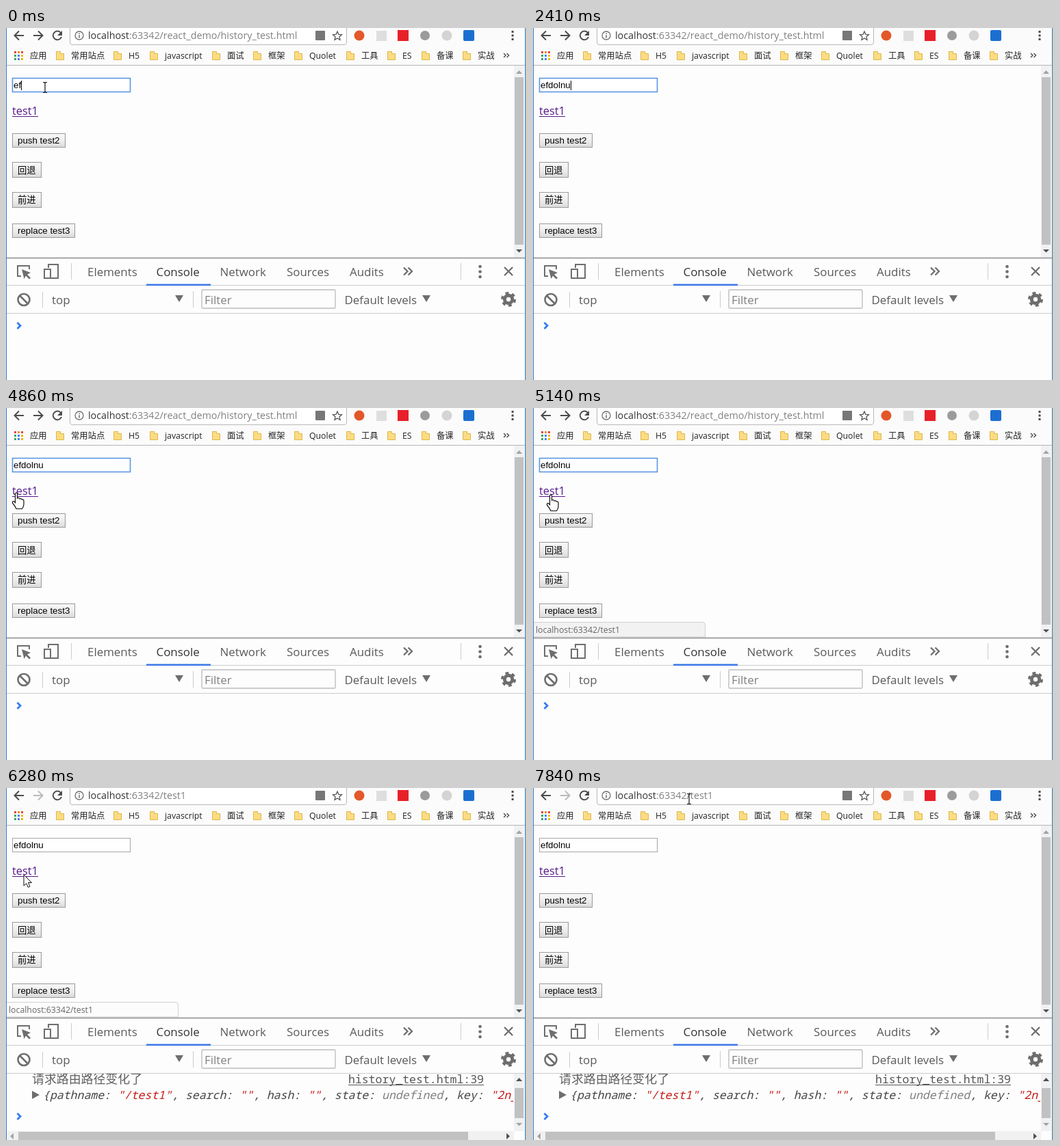
Animation of 761x515 px, one loop 7990 ms. Source, as an HTML page:

```html
<!DOCTYPE html>
<html lang="zh">
<head>
<meta charset="utf-8">
<title>history test</title>
<style>
html, body { margin: 0; width: 100%; height: 100%; overflow: hidden; background: #fdfdfd; }
svg { display: block; width: 100vw; height: 100vh; font-family: "Open Sans", "Noto Sans CJK SC", "Noto Sans CJK", sans-serif; }
.bar { font-size: 12.3px; fill: #222; }
.url { font-size: 14.3px; fill: #808080; }
.form { font: 13.33px "Liberation Sans", "Noto Sans CJK SC", "Noto Sans CJK", sans-serif; }
.tools { font-size: 16.9px; fill: #5a5a5a; }
.mono { font-family: "Noto Sans Mono", "Noto Sans CJK SC", monospace; font-size: 16.5px; }
.line { fill: none; stroke: #6e6e6e; stroke-width: 2; }
.nav { fill: none; stroke: #4c4c4c; stroke-width: 2; }
.rule { fill: none; stroke: #ccc; }
.track { fill: #f1f1f1; }
.thumb { fill: #c1c1c1; }
.dark { fill: #505050; }
.pale { fill: #a3a3a3; }
.grey { fill: #6e6e6e; }
.str { fill: #c41a16; }
</style>
</head>
<body>
<svg viewBox="0 0 761 515">
  <defs>
    <linearGradient id="face" x2="0" y2="1">
      <stop stop-color="#f8f8f8"/><stop offset=".5" stop-color="#eee"/><stop offset="1" stop-color="#dadada"/>
    </linearGradient>
    <clipPath id="log"><rect x="1" y="418" width="740" height="84"/></clipPath>
  </defs>
  <rect width="761" height="515" fill="#fdfdfd"/>
  <rect width="758" height="54" fill="#fbfbfb"/>

  <!-- address bar -->
  <path class="nav" d="M26 11H13M19 4.500L12.500 11L19 17.500"/>
  <path id="forward" class="nav" d="M40 11H53M47 4.500L53.500 11L47 17.500"/>
  <path class="nav" d="M80 7A6.300 6.300 0 1 0 81 13"/>
  <path fill="#4c4c4c" d="M82 4V11H75Z"/>
  <path d="M93.500 -2V21Q93.500 24.500 97 24.500H494Q497.500 24.500 497.500 21V-2" fill="#fff" stroke="#b8b8b8"/>
  <circle cx="107" cy="11" r="6" class="line" style="stroke-width:1.300"/>
  <path class="grey" d="M106.200 7.500h1.600v1.600h-1.600zM106.200 10.300h1.600v4.300h-1.600z"/>
  <text class="url" x="120" y="16"><tspan fill="#333">localhost</tspan>:63342<tspan id="path"></tspan></text>
  <rect x="452" y="4" width="14" height="14" rx="1" fill="#777"/>
  <path d="M484 5l1.900 4.300 4.600.4-3.500 3.100 1 4.600-4-2.400-4 2.400 1-4.600-3.500-3.100 4.600-.4z" fill="none" stroke="#555" stroke-width="1.300"/>
  <circle cx="516" cy="11" r="7.500" fill="#e2582a"/>
  <rect x="541" y="4" width="15" height="15" fill="#dedede"/>
  <rect x="572" y="3" width="16" height="16" fill="#e8202a"/>
  <circle cx="612" cy="11" r="7" fill="#9b9b9b"/>
  <circle cx="644" cy="11" r="7.500" fill="#d4d4d4"/>
  <rect x="668" y="3" width="16" height="16" rx="2" fill="#1c6fd0"/>
  <path fill="#4c4c4c" d="M738.500 4h3v3h-3zM738.500 9.500h3v3h-3zM738.500 15h3v3h-3z"/>

  <g id="bookmarks" class="bar">
    <text x="35" y="45">应用</text>
    <path d="M727 37l3 3-3 3M731.500 37l3 3-3 3" fill="none" stroke="#444" stroke-width="1.300"/>
  </g>
  <path stroke="#b5b5b5" d="M1 54.500H758"/>

  <!-- page -->
  <rect id="input" x="9.500" y="73.500" width="172" height="20" fill="#fff"/>
  <text id="typed" class="form" x="11" y="88"></text>
  <rect id="caret" y="77" width="1" height="14"/>
  <g id="link"><text x="9" y="127" font-size="16.400">test1</text><rect x="9" y="129" width="38" height="1"/></g>
  <g id="buttons" class="form"></g>
  <rect class="track" x="742" y="55" width="15" height="280"/>
  <rect class="thumb" x="743" y="72" width="13" height="245"/>
  <path class="pale" d="M745 67l4.500-5 4.500 5z"/>
  <path class="dark" d="M745 324l4.500 4.500 4.500-4.500z"/>
  <g id="status">
    <path id="bubble" d="M1 313.500H248Q251.500 313.500 251.500 317V335H1" stroke="#d0d0d0"/>
    <text x="4" y="329" font-size="12.300" fill="#666">localhost:63342/test1</text>
  </g>

  <!-- developer tools -->
  <rect x="1" y="335.500" width="757" height="2" fill="#a3a3a3"/>
  <path class="rule" d="M1 376.500H758M1 417.500H758M95.500 344V368M664.500 344V368M53.500 386V409M273.500 385V409"/>
  <path class="line" d="M22 363H17V348H34V353"/>
  <path class="grey" d="M23 353l13 5-5 2.500 5 5-2 2-5-5-2.500 4.500z"/>
  <path class="line" d="M62 351V346H76V366H66M56 353H65V366H56Z"/>
  <g class="tools">
    <text x="119" y="363">Elements</text>
    <text x="219.500" y="363" fill="#333">Console</text>
    <text x="312.500" y="363">Network</text>
    <text x="410" y="363">Sources</text>
    <text x="502" y="363">Audits</text>
    <text x="67" y="404">top</text>
    <rect class="rule" x="286" y="383" width="195" height="27" rx="1.500" fill="#fff" style="stroke-width:1.800"/>
    <text x="290" y="404" fill="#808080">Filter</text>
    <text x="494.500" y="404">Default levels</text>
  </g>
  <rect x="205" y="374.500" width="94" height="2.500" fill="#3b78e7"/>
  <path class="line" style="stroke-width:2.300" d="M581 350.500l5.500 5.500-5.500 5.500M587.500 350.500l5.500 5.500-5.500 5.500M728 350l12 12M740 350l-12 12"/>
  <g class="grey"><circle cx="692.500" cy="349" r="2.300"/><circle cx="692.500" cy="356.500" r="2.300"/><circle cx="692.500" cy="364" r="2.300"/></g>
  <path class="grey" d="M247 391h12l-6 10zM608 391h12l-6 10z"/>
  <path class="line" style="stroke-width:2.600" d="M34.500 397.500a8.500 8.500 0 1 0-17 0a8.500 8.500 0 1 0 17 0M20 391.500l12 12"/>
  <circle class="line" cx="734" cy="397" r="5.700" style="stroke-width:5"/>
  <circle class="line" cx="734" cy="397" r="9" style="stroke-width:4;stroke-dasharray:4.700 4.725"/>

  <g id="console">
    <g clip-path="url(#log)">
      <text x="38" y="432" font-size="17.900" fill="#606060">请求路由路径变化了</text>
      <text class="mono" x="500" y="432" fill="#555">history_test.html:39</text>
      <path stroke="#555" d="M500 434.500H698"/>
      <path class="grey" d="M38 443l11 6-11 6z"/>
      <text class="mono" x="54" y="455" font-style="italic" fill="#444">{pathname: <tspan class="str">"/test1"</tspan>, search: <tspan class="str">""</tspan>, hash: <tspan class="str">""</tspan>, state: <tspan fill="#808080">undefined</tspan>, key: <tspan class="str">"2njq"</tspan></text>
    </g>
    <path class="track" d="M742 418h15v84h-15zM1 502h741v13H1z"/>
    <path class="thumb" d="M743 439h13v44h-13zM18 503h657v12H18z"/>
    <path class="dark" d="M745 429l4.500-5 4.500 5zM731 505l5 4.500-5 4.500z"/>
    <path class="pale" d="M745 490l4.500 4.500 4.500-4.500zM11 505l-5 4.500 5 4.500z"/>
  </g>
  <path id="prompt" d="M16.500 431l4.500 4.500-4.500 4.500" fill="none" stroke="#367cf1" stroke-width="2.800"/>
  <path d="M.5 0V515M758.500 0V515" stroke="#2b7cd3"/>
  <rect x="759" width="2" height="515" fill="#d3cbb8"/>

  <!-- pointers, origin at the hot spot -->
  <path id="ibeam" d="M-3 -7.500H-1L0 -6.500L1 -7.500H3M0 -6.500V6.500M-3 7.500H-1L0 6.500L1 7.500H3" fill="none" stroke="#111" stroke-width="1.200"/>
  <path id="arrow" d="M0 0V16L3.700 12.500L6.300 18.300L9 17L6.500 11.500H11.500Z" fill="#fff" stroke="#111"/>
  <path id="hand" d="M-1.500 1Q0 -1 1.500 1V8Q4 6.500 5 9Q7.500 8 8.300 10Q11 9.500 11 12V17Q11 20 8.500 23.500H0Q-2 19 -5.500 15Q-6 12 -3.500 12.500L-1.500 14.500Z" fill="#fff" stroke="#111" stroke-width="1.200"/>
</svg>
<script>
const LOOP = 7990, FOCUS_LOST = 6000, NAVIGATED = 6280;
const $ = id => document.getElementById(id);
const draw = (id, markup) => $(id).insertAdjacentHTML('beforeend', markup);

const gridColors = ['#e8453c', '#f28b25', '#e8453c', '#3aa757', '#4285f4', '#f4b400', '#3aa757', '#4285f4', '#f4b400'];
gridColors.forEach((color, i) =>
  draw('bookmarks', `<rect x="${12 + i % 3 * 5}" y="${34 + Math.floor(i / 3) * 5}" width="3" height="3" fill="${color}"/>`));

[[73, '常用站点'], [157, 'H5'], [210, 'javascript'], [301, '面试'], [361, '框架'], [421, 'Quolet'],
 [497, '工具'], [557, 'ES'], [607, '备课'], [667, '实战']].forEach(([x, label]) =>
  draw('bookmarks', `<path d="M${x + .5} 34.500h6v3h5v9h-11z" fill="#fbdc82" stroke="#dfb64a"/>
    <text x="${x + 22}" y="45">${label}</text>`));

// top, width, height, baseline, label
[[154, 78, 21, 169, 'push test2'], [196, 43, 23, 213, '回退'], [240, 43, 23, 256, '前进'], [286, 92, 21, 301, 'replace test3']].forEach(([y, w, h, baseline, label]) =>
  draw('buttons', `<rect x="9.500" y="${y + .5}" width="${w - 1}" height="${h - 1}" fill="url(#face)" stroke="#999"/>
    <text x="17" y="${baseline}">${label}</text>`));

const word = 'efdolnu';
const keyTimes = [590, 740, 900, 1050, 1330];
const caretFlips = [1860, 2410, 2810, 3350, 3900, 4310, 4860, 5410, FOCUS_LOST];

// time, pointer, x, y
const pointerSteps = [
  [0, 'ibeam', 57, 87], [2130, 'arrow', 63, 50], [2270, 'arrow', 71, 9], [2410, 'none', 0, 0],
  [2940, 'ibeam', 140, 8], [3080, 'ibeam', 210, 10], [3210, 'ibeam', 280, 12], [3350, 'ibeam', 330, 14],
  [3490, 'ibeam', 365, 15], [3620, 'ibeam', 387, 16], [3770, 'ibeam', 402, 16],
  [3900, 'ibeam', 411, 18], [4040, 'arrow', 370, 45], [4180, 'arrow', 300, 70], [4310, 'arrow', 215, 90],
  [4450, 'arrow', 135, 102], [4590, 'arrow', 75, 112], [4720, 'arrow', 33, 130], [4860, 'hand', 15, 124],
  [5020, 'hand', 20, 126], [5140, 'hand', 26, 127], [NAVIGATED, 'arrow', 26, 127],
  [7020, 'arrow', 42, 117], [7150, 'arrow', 85, 92], [7290, 'arrow', 135, 60], [7430, 'arrow', 175, 35],
  [7560, 'ibeam', 203, 19], [7700, 'ibeam', 220, 17], [7840, 'ibeam', 228, 16]
];
const statusSteps = [[0, 0], [5020, .5], [5140, 1], [7150, .5], [7290, 0]];

const passed = (times, t) => times.filter(time => time <= t).length;
const current = (steps, t) => steps.findLast(step => step[0] <= t);
const show = (id, on) => $(id).setAttribute('visibility', on ? 'visible' : 'hidden');

function render(t) {
  const focused = t < FOCUS_LOST, navigated = t >= NAVIGATED;

  $('typed').textContent = word.slice(0, 2 + passed(keyTimes, t));
  $('caret').setAttribute('x', Math.round(11 + $('typed').getComputedTextLength()));
  show('caret', focused && passed(caretFlips, t) % 2 === 0);
  $('input').setAttribute('stroke', focused ? '#5a96e3' : '#a6a6a6');
  $('input').setAttribute('stroke-width', focused ? 1.6 : 1);

  $('link').setAttribute('fill', focused || navigated ? '#551a8b' : '#e00');
  $('path').textContent = navigated ? '/test1' : '/react_demo/history_test.html';
  $('forward').style.stroke = navigated ? '#bbb' : '#4c4c4c';
  $('bubble').setAttribute('fill', navigated ? '#fcfcfc' : '#f2f2f2');
  $('status').setAttribute('opacity', current(statusSteps, t)[1]);
  show('console', navigated);
  $('prompt').setAttribute('transform', `translate(0 ${navigated ? 45 : 0})`);

  const [, kind, x, y] = current(pointerSteps, t);
  for (const id of ['ibeam', 'arrow', 'hand']) {
    show(id, id === kind);
    $(id).setAttribute('transform', `translate(${x} ${y})`);
  }
}

const start = performance.now();
function tick() {
  render((performance.now() - start) % LOOP);
  requestAnimationFrame(tick);
}
tick();
</script>
</body>
</html>
```
